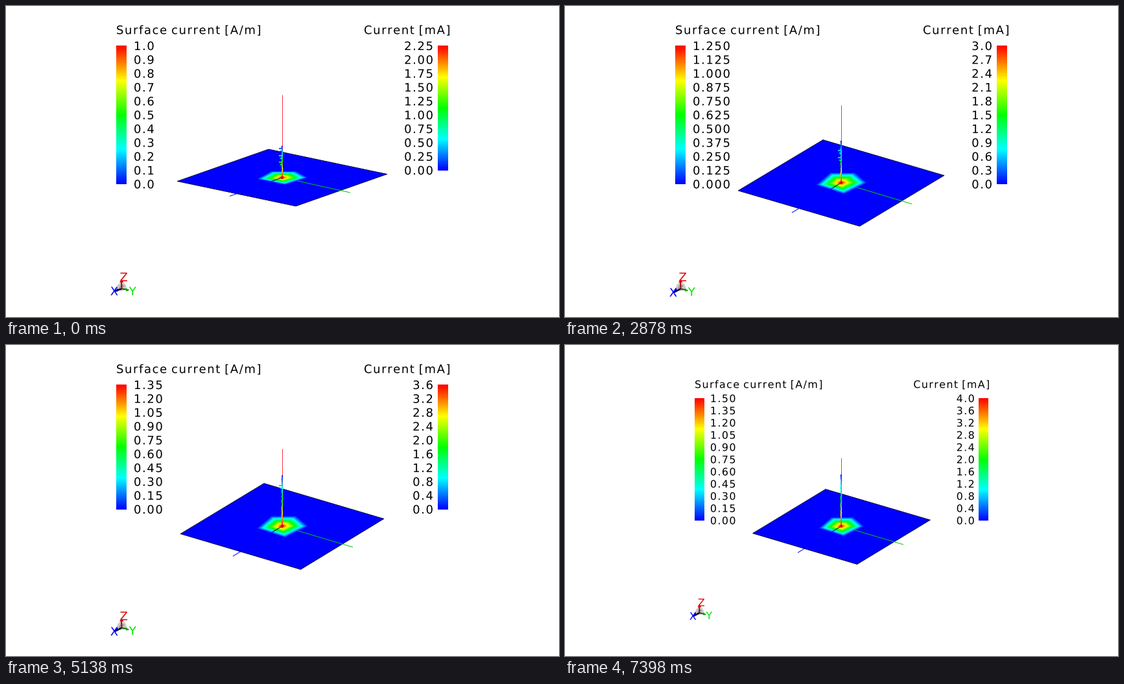
A matplotlib script that plays this animation: 853 by 480 pixels, repeating every 7850 ms.

```python
import numpy as np
import matplotlib.pyplot as plt
from matplotlib.animation import FuncAnimation
from matplotlib.collections import LineCollection, PolyCollection
from matplotlib.colors import LinearSegmentedColormap
from matplotlib.patches import Circle, PathPatch, Polygon
from matplotlib.path import Path
from matplotlib.textpath import TextPath
from matplotlib.transforms import Affine2D

W, H, DPI = 853, 480, 64
LOOP, STEP = 7850, 10
FIRST, HOLD = 1070, 1130      # first view is slightly shorter than the rest
FONT = dict(family="DejaVu Sans")
SIZE, TRACK, SPACE = 18, 1.6, 5.3
ROW, BAR_TOP, BAR_WIDTH = 21.35, 62, 16
RAINBOW = LinearSegmentedColormap.from_list(
    "rainbow", ["#0000ff", "#00ffff", "#00ff00", "#ffff00", "#ff0000"])
PATCH = np.array([(-40, 3.5), (-17.5, -16), (22, -16), (41, 0), (4.5, 18)])

# left/right: (rows, step, decimals); ticks: coil spurs as fractions of its height
VIEWS = [
    dict(left=(10, .1, 1), right=(9, .25, 2), z=137, coil=216, mid=264.8, tilt=.63,
         plane=[(264, 270.5), (405, 221), (588, 259.5), (447, 309)],
         x=(345, 293.5), y=(531, 288), ticks=(.08, .3, .5)),
    dict(left=(9, .125, 3), right=(9, .3, 1), z=148, coil=218, mid=268.8,
         plane=[(266, 280.5), (398, 201.5), (586, 257), (455, 336.5)],
         x=(350, 315), y=(535, 300.5), ticks=()),
    dict(left=(10, .125, 3), right=(10, .3, 1), z=153, coil=208, mid=272.8,
         plane=[(267, 285), (398, 206.5), (585, 261.5), (454.5, 340)],
         x=(350, 319), y=(535, 305.5), ticks=(.22, .4)),
    dict(left=(10, .125, 3), right=(8, .4, 1), z=156, coil=203, mid=276.3,
         plane=[(268, 289), (398, 210.5), (584, 265), (454.5, 343.5)],
         x=(350, 322.5), y=(535, 309), ticks=(0, .27)),
    dict(left=(9, .15, 2), right=(9, .4, 1), z=159.5, coil=201, mid=279.6,
         plane=[(269, 291.5), (398, 213.5), (583, 268.2), (454.5, 346.5)],
         x=(350, 326), y=(535, 312), ticks=(.2,)),
    dict(left=(10, .15, 2), right=(10, .4, 1), z=162, coil=198, mid=282.6,
         plane=[(270, 294.5), (399, 216.7), (582, 271.3), (454, 348.7)],
         x=(350, 328.5), y=(535, 315), ticks=(.1,)),
    dict(left=(10, .15, 2), right=(10, .4, 1), z=174, coil=200, mid=279.6, scale=.883,
         plane=[(289.5, 290.7), (402, 222.5), (563.5, 270), (450.5, 338.5)],
         x=(359, 320.5), y=(522, 308), ticks=()),
]

fig = plt.figure(figsize=(W / DPI, H / DPI), dpi=DPI, facecolor="white")
ax = fig.add_axes([0, 0, 1, 1])
ax.set(xlim=(0, W), ylim=(H, 0))
ax.set_autoscale_on(False)
ax.axis("off")


def px(width):
    return width * 72 / DPI


def right_edge(s):
    return TextPath((0, 0), s, size=SIZE, prop=FONT).get_extents().x1


ADVANCE = {" ": SPACE}


def advance(ch):
    if ch not in ADVANCE:
        ADVANCE[ch] = right_edge(ch + "|") - right_edge("|") + TRACK
    return ADVANCE[ch]


def glyphs(s, x, base, align="left"):
    """Outlines of a tracked string, in stage pixels."""
    if align == "right":
        x -= sum(map(advance, s)) - TRACK
    paths = []
    for ch in s:
        if ch != " ":
            shape = TextPath((0, 0), ch, size=SIZE, prop=FONT)
            paths.append(Affine2D().scale(1, -1).translate(x, base).transform_path(shape))
        x += advance(ch)
    return paths


def text_patch(paths, color, trans):
    return PathPatch(Path.make_compound_path(*paths), fc=color, lw=0, transform=trans)


def line(points, color, width=1.0, trans=None):
    return LineCollection([points], colors=[color], linewidths=px(width),
                          transform=trans or ax.transData)


def legends(view, trans):
    paths = glyphs("Surface current [A/m]", 170, 43.3)
    paths += glyphs("Current [mA]", 552, 43.3)
    ramp = np.linspace(1, 0, 128)[:, None]
    artists = []
    for side, bar_x, text_x, align in (("left", 170, 197, "left"),
                                       ("right", 666, 659, "right")):
        rows, step, digits = view[side]
        for k in range(rows + 1):
            label = f"{(rows - k) * step:.{digits}f}"
            paths += glyphs(label, text_x, BAR_TOP + k * ROW + 6, align)
        bottom = BAR_TOP + rows * ROW
        artists.append(ax.imshow(ramp, cmap=RAINBOW, aspect="auto", interpolation="nearest",
                                 extent=(bar_x, bar_x + BAR_WIDTH, bottom, BAR_TOP),
                                 transform=trans))
    artists.append(text_patch(paths, "black", trans))
    return artists


def triad(trans, drop):
    c = (178.5, 436.5)
    x_end, y_end = (168, 440 + drop), (189, 438 + drop / 2)
    shell = [(170, 438), (172.5, 430), (178, 426), (184, 429), (187, 437), (178.5, 440)]
    return [
        Polygon(shell, fc="#b4b4b4", alpha=.7, lw=0, transform=trans),
        Polygon([(173, 437), c, (183, 432), (178, 429)], fc="#808080", alpha=.6, lw=0,
                transform=trans),
        line([c, x_end], "#000030", 2.4, trans),
        line([c, y_end], "#006000", 1.8, trans),
        line([c, (178, 425)], "#b00000", 1.8, trans),
        Polygon([(175, 426.5), (178.5, 422), (181.5, 426.5)], fc="#d00000", lw=0,
                transform=trans),
        Polygon([(172, 435.5), (167, 441 + drop), (173, 440.5)], fc="#000080", lw=0,
                transform=trans),
        Polygon([(185, 435.5), (190, 439 + drop / 2), (185, 440.5)], fc="#00b000", lw=0,
                transform=trans),
        text_patch(glyphs("Z", 175.5, 424.7), "#e60000", trans),
        text_patch(glyphs("X", 160.8, 446.5 + drop), "#0000ff", trans),
        text_patch(glyphs("Y", 189.8, 446.5 + drop / 2), "#00e600", trans),
    ]


def coil(top, mid, ticks, rng):
    n = 36
    y = np.linspace(top, mid, n + 1)
    x = 425.9 + rng.uniform(-.7, .7, n + 1)
    pts = np.column_stack([x, y])
    segs = list(np.stack([pts[:-1], pts[1:]], axis=1))
    values = list((np.arange(n) + .5) / n)
    for t in ticks:
        ty = top + t * (mid - top)
        for k, reach in enumerate((5, 3)):
            row = ty + 4 * k + .5
            segs.append(np.array([(426 - reach, row), (426, row)]))
            values.append(t)
    return LineCollection(segs, colors=RAINBOW(values), linewidths=px(1.8))


def model(view, rng):
    mid, scale = view["mid"], view.get("scale", 1)
    c = np.array([426, mid])
    x_end, y_end = np.array(view["x"]), np.array(view["y"])
    levels = np.linspace(0, 1, 41)
    spot = PATCH * scale * (1, view.get("tilt", 1))
    rings = [c + spot * (1 - v) for v in levels[:-1]]
    return [
        Polygon(view["plane"], fc="#0000ff", ec="black", lw=px(.7)),
        PolyCollection(rings, facecolors=RAINBOW(levels[:-1]), linewidths=0),
        line([c + .2 * (x_end - c), x_end], "#0000ff"),
        line([c, c + .2 * (x_end - c)], "#00003c"),
        line([c + .22 * (y_end - c), y_end], "#00c800"),
        line([(426.5, view["z"]), (426.5, mid)], "#ff3040"),
        coil(view["coil"], mid, view["ticks"], rng),
        Circle(c, 2.3 * scale, fc="#e00000", lw=0),
    ]


def build(index, view):
    s = view.get("scale", 1)
    trans = Affine2D().translate(-426.5, -240).scale(s).translate(426.5, 240) + ax.transData
    parts = legends(view, trans)
    parts += model(view, np.random.default_rng(index))
    parts += triad(trans, 0 if index == 0 else 2)
    for order, part in enumerate(parts):
        if part.axes is None:
            ax.add_artist(part)
        part.set_zorder(order)
    return parts


scenes = [build(i, v) for i, v in enumerate(VIEWS)]


def update(frame):
    now = max(0, (frame * STEP - FIRST) // HOLD + 1)
    for i, parts in enumerate(scenes):
        for part in parts:
            part.set_visible(i == now)
    return []


anim = FuncAnimation(fig, update, frames=LOOP // STEP, interval=STEP,
                     init_func=lambda: update(0), repeat=True, repeat_delay=0)
plt.show()
```
